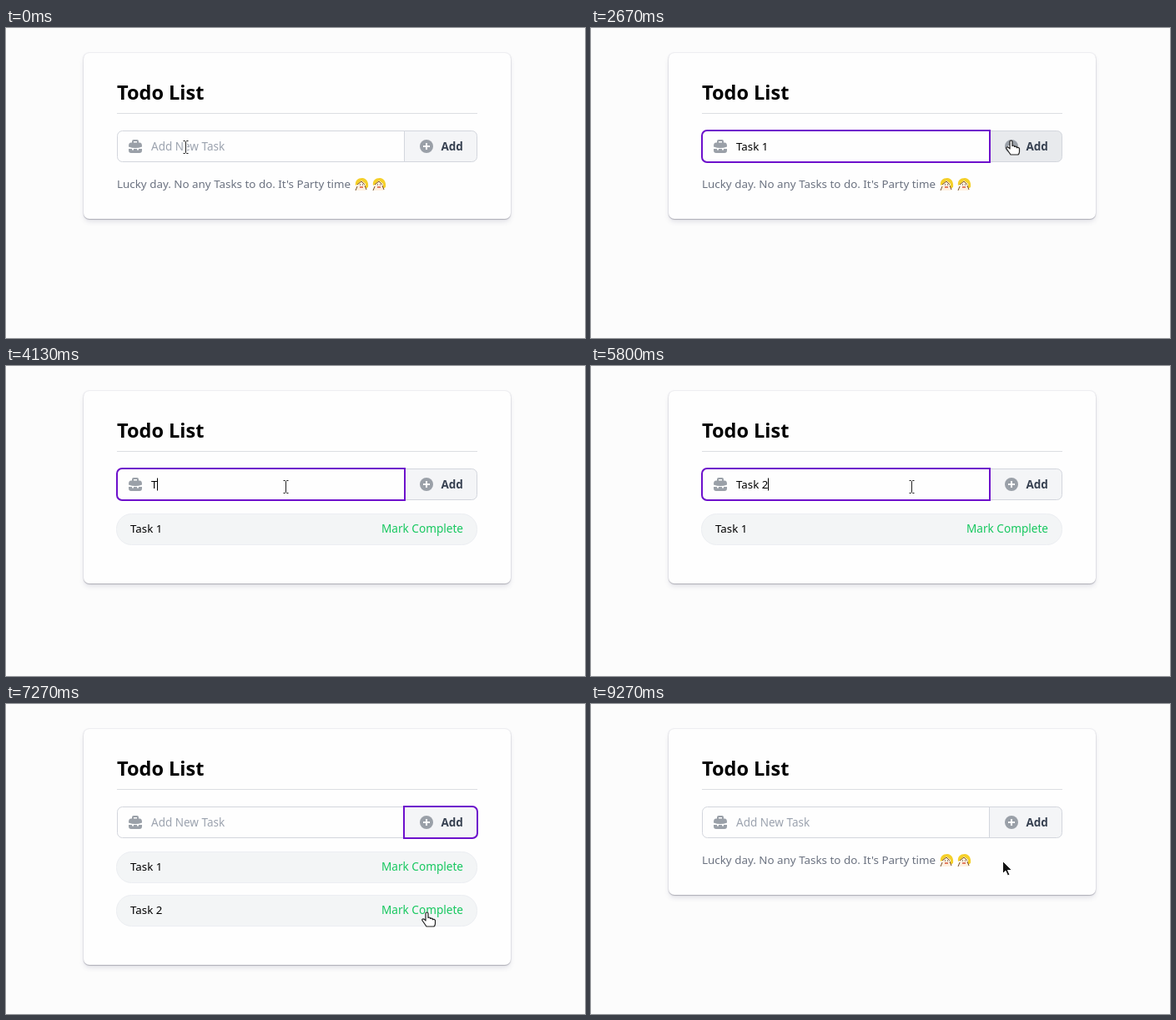
An HTML page that plays this animation: 694 by 372 pixels, repeating every 9340 ms.

```html
<!DOCTYPE html>
<html lang="en">
<head>
<meta charset="utf-8">
<title>Todo List</title>
<style>
html, body { margin: 0; width: 100%; height: 100%; overflow: hidden; background: #fcfcfc; }
#card {
  position: absolute; left: 93px; top: 30px; width: 512px; border-radius: 7px;
  background: #fefefe;
  box-shadow: 0 0 1px 1px rgba(120, 120, 150, .1), 0 1px 1px rgba(60, 60, 70, .28), 0 4px 6px -1px rgba(70, 70, 110, .16);
}
svg { position: absolute; left: 0; top: 0; }
text { font: 13.5px "Noto Sans", "Open Sans", sans-serif; fill: #000; white-space: pre; }
.title { font-size: 23.5px; font-weight: 700; }
.task { font-size: 13.3px; font-weight: 500; }
.add { font-weight: 600; fill: #374151; }
.hint { fill: #9ca3af; }
.lucky { font-size: 13.4px; fill: #6b7280; }
.mark { font-size: 13.6px; fill: #18c860; }
.line { fill: none; stroke: #d3d6dd; }
.ring { fill: none; stroke: #6d10cc; stroke-width: 2; }
.icon { fill: #9aa0a8; }
.row rect { fill: #f3f5f6; stroke: #eceef2; }
</style>
</head>
<body>
<div id="card"></div>
<svg width="694" height="372" viewBox="0 0 694 372">
  <defs>
    <g id="dancer">
      <path d="M1 9C0 3 4 0 9 0s8 5 7 11l-3 2V7L8 4 3 8z" fill="#f5d02a"/>
      <path d="M3 8l5-5 5 4v5l2 3H2z" fill="#fff0e0"/>
      <path d="M3 8l5-4 4 4M3 10l-2 5M12 9l2 5" fill="none" stroke="#7a5026"/>
      <path d="M6 8h1M9 8h1" stroke="#39301c"/>
      <path d="M6 11h4" stroke="#d95a3a" stroke-width="1.5"/>
    </g>
    <g id="task" class="row">
      <rect x="132.5" y="177.5" width="432" height="37" rx="18"/>
      <text class="mark" x="450" y="200">Mark Complete</text>
    </g>
  </defs>

  <text class="title" x="133" y="85.5">Todo List</text>
  <path d="M133 102.5H565" stroke="#dcdee2"/>

  <path class="line" d="M478.5 123.5H139.5a6 6 0 0 0-6 6v25a6 6 0 0 0 6 6H478.5"/>
  <path id="button" class="line" d="M477.5 123.5H558.5a6 6 0 0 1 6 6v25a6 6 0 0 1-6 6H477.5z"/>

  <g class="icon">
    <path d="M151 138v-2q0-2 2-2h4q2 0 2 2v2h-2v-2h-4v2z"/>
    <path d="M150 137.5h10q3 0 3 4v1q-8 3-16 0v-1q0-4 3-4z"/>
    <path d="M147 145h4v1.5h2V145h4v1.5h2V145h4v2q0 3-3 3h-10q-3 0-3-3z"/>
    <circle cx="504" cy="142" r="8"/>
  </g>
  <path d="M500 142h8M504 138v8" stroke="#fefefe" stroke-width="2"/>
  <text class="add" x="521.5" y="147">Add</text>

  <text id="hint" class="hint" x="174" y="147">Add New Task</text>
  <text id="typed" class="task" x="174" y="147"></text>
  <path id="caret" d="M.5 134.5v15" stroke="#000"/>
  <path id="inputRing" class="ring" d="M478 123H139a6 6 0 0 0-6 6v26a6 6 0 0 0 6 6H478z"/>
  <path id="buttonRing" class="ring" d="M477 123H559a6 6 0 0 1 6 6v26a6 6 0 0 1-6 6H477z"/>

  <g id="lucky">
    <text class="lucky" x="133" y="192">Lucky day. No any Tasks to do. It's Party time</text>
    <use href="#dancer" x="418" y="180"/>
    <use href="#dancer" x="439" y="180"/>
  </g>
  <g id="row1"><use href="#task"/><text class="task" x="149" y="200">Task 1</text></g>
  <g id="row2"><use href="#task" y="52"/><text class="task" x="149" y="252">Task 2</text></g>

  <g id="cursor">
    <g id="beam" fill="none">
      <path d="M-3-8h2l1 1 1-1h2M0-7V6M-3 7h2l1-1 1 1h2" stroke="#fff" stroke-width="3"/>
      <path d="M-3-8h2l1 1 1-1h2M0-7V6M-3 7h2l1-1 1 1h2" stroke="#222"/>
    </g>
    <path id="hand" d="M-1.5 1q0-1.5 1.5-1.5T1.5 1V6q1-1 2.500 0v1q1.500-1 2.800.2v1q2-1 3.200.8v4q0 2-1.500 3.500H-.5L-5 10q-1.500-2 0-2.500 1.500-.5 3.500 2z"
      fill="#fff" stroke="#222" stroke-width="1.2" stroke-linejoin="round"/>
    <path id="arrow" d="M0 0V15l3.500-3.200L6 17.500l2.500-1L6 11h5z" fill="#111" stroke="#fff"/>
  </g>
</svg>
<script>
const LOOP = 9340;
const el = id => document.getElementById(id);
const show = (id, on) => { el(id).style.display = on ? "" : "none"; };

// Pointer stops: time, x, y
const path = [
  [0, 215, 143], [1930, 215, 143], [2500, 503, 135], [3270, 503, 135],
  [3770, 335, 145], [5070, 335, 145], [5600, 384, 145], [5870, 384, 145],
  [6400, 503, 138], [6730, 503, 138], [7200, 504, 250], [8070, 504, 250],
  [8400, 535, 222], [8800, 493, 188]
];
// Each run of typing: focus, blur, text, key times
const runs = [
  { from: 330, to: 3130, text: "Task 1", keys: [730, 930, 1070, 1200, 1400, 1670] },
  { from: 3800, to: 6600, text: "Task 2", keys: [4070, 4270, 4470, 4670, 4930, 5270] }
];
const within = (t, a, b) => t >= a && t < b;
const ease = p => p * p * (3 - 2 * p);

function pointer(t) {
  const i = path.findIndex(stop => stop[0] > t);
  if (i < 0) return path[path.length - 1].slice(1);
  const [t0, x0, y0] = path[i - 1], [t1, x1, y1] = path[i];
  const p = ease((t - t0) / (t1 - t0));
  return [Math.round(x0 + (x1 - x0) * p), Math.round(y0 + (y1 - y0) * p)];
}

function draw(t) {
  const row1 = within(t, 3130, 9070), row2 = within(t, 6600, 7530);
  const rows = row1 + row2;
  show("row1", row1);
  show("row2", row2);
  show("lucky", !rows);
  el("card").style.height = [199, 231, 283][rows] + "px";

  const run = runs.find(r => within(t, r.from, r.to));
  const done = run ? run.keys.filter(k => k <= t) : [];
  const typed = el("typed");
  typed.textContent = run ? run.text.slice(0, done.length) : "";
  show("hint", !done.length);
  show("inputRing", run);
  show("buttonRing", within(t, 3130, 3800) || within(t, 6600, 7530));

  const last = done.length ? done[done.length - 1] : run ? run.from : 0;
  show("caret", run && (t - last) % 1200 < 600);
  const end = done.length ? typed.getComputedTextLength() : 0;
  el("caret").setAttribute("transform", `translate(${Math.round(174 + end)} 0)`);

  const [x, y] = pointer(t);
  const inBar = within(y, 123, 162);
  const onButton = inBar && within(x, 478, 566);
  const onMark = within(x, 450, 549) &&
    (row1 && within(y, 187, 205) || row2 && within(y, 239, 257));
  const kind = onButton || onMark ? "hand" : inBar && within(x, 133, 478) ? "beam" : "arrow";
  for (const id of ["beam", "hand", "arrow"]) show(id, id === kind);
  el("cursor").setAttribute("transform", `translate(${x + .5} ${y + .5})`);
  el("button").style.fill = onButton ? "#e8eaed" : "#f4f5f7";
}

const start = performance.now();
function tick() {
  draw((performance.now() - start) % LOOP);
  requestAnimationFrame(tick);
}
tick();
</script>
</body>
</html>
```
